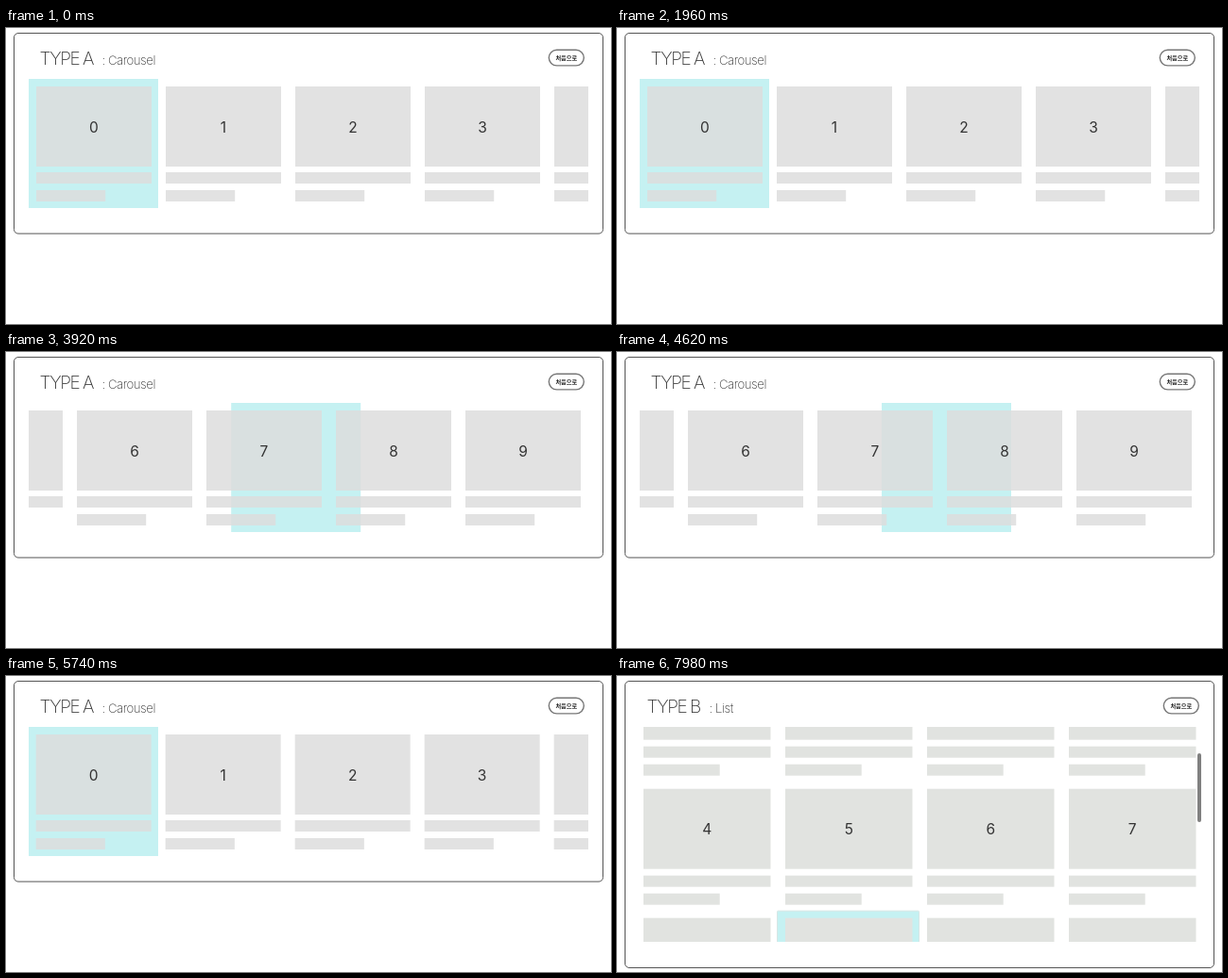
An HTML page that plays this animation: 640 by 314 pixels, repeating every 8 s.

```html
<!DOCTYPE html>
<html lang="ko">
<head>
<meta charset="utf-8">
<title>Carousel and list</title>
<style>
  html, body { margin: 0; width: 100%; height: 100%; overflow: hidden; background: #fff; }
  body > svg { display: block; width: 100vw; height: 100vh; }
  text { font-family: Inter, "Open Sans", sans-serif; fill: #333; }
  .title { font-size: 19px; font-weight: 200; letter-spacing: -1.5px; }
  .sub { font-size: 13.2px; font-weight: 200; letter-spacing: -.45px; }
  .button { font: 700 6.2px "Noto Sans CJK KR", "Noto Sans CJK", sans-serif; fill: #222; }
  .num { font-size: 15.5px; }
  .middle { text-anchor: middle; }
  .frame { fill: #fff; stroke: #555; }
  .pill { fill: #fff; stroke: #777; stroke-width: 1.4; }
  .focus { fill: #c5f1f2; }
  .a .card { fill: rgba(221, 221, 221, .85); }
  .b .card { fill: #e1e3e0; }
  .b .focus { stroke: #d6e6e5; }
</style>
</head>
<body>
<svg viewBox="0 0 640 314"></svg>
<script>
const STEP = 137;        // carousel pitch and list row height
const COLUMN = 150;
const MAX_SCROLL = 779;

const stage = document.querySelector('svg');

const rect = (cls, x, y, w, h, r = 0, id = '') =>
  `<rect class="${cls}" id="${id}" x="${x}" y="${y}" width="${w}" height="${h}" rx="${r}"/>`;
const text = (cls, x, y, s) => `<text class="${cls}" x="${x}" y="${y}">${s}</text>`;

// Picture, number and two bars; the second bar is 60% wide.
const card = (n, x, y, w, barY) =>
  rect('card', x, y, w, 85) +
  text('num middle', x + w / 2, y + 48.5, n) +
  rect('card', x, y + barY, w, 12) +
  rect('card', x, y + barY + 19, w * .6, 12);

const cards = (count, make) => Array.from({ length: count }, (_, n) => make(n)).join('');

function panel(cls, name, kind, height, titleX, buttonX, view, content) {
  const [x, y, w, h] = view;
  return `<g class="${cls}" id="${cls}">` +
    rect('frame', 8.5, 5.5, 623, height, 4.5) +
    text('title', titleX, 39, name) +
    text('sub', titleX + 66, 39, ': ' + kind) +
    rect('pill', buttonX, 23.3, 37, 16.6, 8.3) +
    text('button middle', buttonX + 18.5, 34.1, '처음으로') +
    `<svg x="${x}" y="${y}" width="${w}" height="${h}" viewBox="${view.join(' ')}">${content}</svg></g>`;
}

stage.innerHTML =
  panel('a', 'TYPE A', 'Carousel', 212.6, 35.5, 574.3, [24, 54, 592, 138],
    rect('focus', 24, 54, STEP, STEP, 0, 'focusA') +
    `<g id="rowA">${cards(10, n => card(n, 32 + n * STEP, 62, 122, 91))}</g>`) +
  panel('b', 'TYPE B', 'List', 304, 31.5, 578.3, [18, 54, 602, 228],
    `<g id="listB">${rect('focus', 19.5, 54.5, COLUMN, STEP, 1, 'focusB')}` +
    cards(20, n => card(n, 28 + n % 4 * COLUMN, 62 + (n >> 2) * STEP, 134.5, 92)) + '</g>' +
    '<rect id="thumb" x="614" width="4" height="73" rx="2" fill="#808080"/>');

const el = id => document.getElementById(id);
const shift = (id, x, y) => el(id).setAttribute('transform', `translate(${x} ${y})`);
const show = (id, on) => el(id).style.display = on ? '' : 'none';

// Eased progress from 0 to 1, starting at the given time.
function move(t, start, duration) {
  const p = Math.min(1, Math.max(0, (t - start) / duration));
  return p < .5 ? 2 * p * p : 1 - 2 * (1 - p) ** 2;
}

// Cards passed by repeated key presses.
function presses(t, start, count, gap) {
  let sum = 0;
  for (let k = 0; k < count; k++) sum += move(t, start + k * gap, gap);
  return sum;
}

function drawCarousel(t) {
  const scroll = STEP * (move(t, 1195, 275) - move(t, 1690, 265)) +
    MAX_SCROLL * (move(t, 2260, 665) - move(t, 5147, 603));
  const focus = 454.5 * (move(t, 2260, 547) - move(t, 5240, 500)) -
    STEP * (presses(t, 3385, 3, 325) - presses(t, 4125, 3, 325));
  shift('rowA', -scroll, 0);
  shift('focusA', focus, 0);
}

function drawList(t) {
  const scroll = 46 * move(t, 7400, 300) + STEP * move(t, 7740, 691);
  shift('listB', 0, -scroll);
  shift('focusB', COLUMN * move(t, 6890, 390), STEP * presses(t, 7390, 2, 285));
  shift('thumb', 0, 56.5 + scroll * .32);
  show('thumb', scroll > 0);
}

function draw() {
  const t = performance.now() % 8000;
  show('a', t < 6720);
  show('b', t >= 6720);
  drawCarousel(t);
  drawList(t);
  requestAnimationFrame(draw);
}
draw();
</script>
</body>
</html>
```
